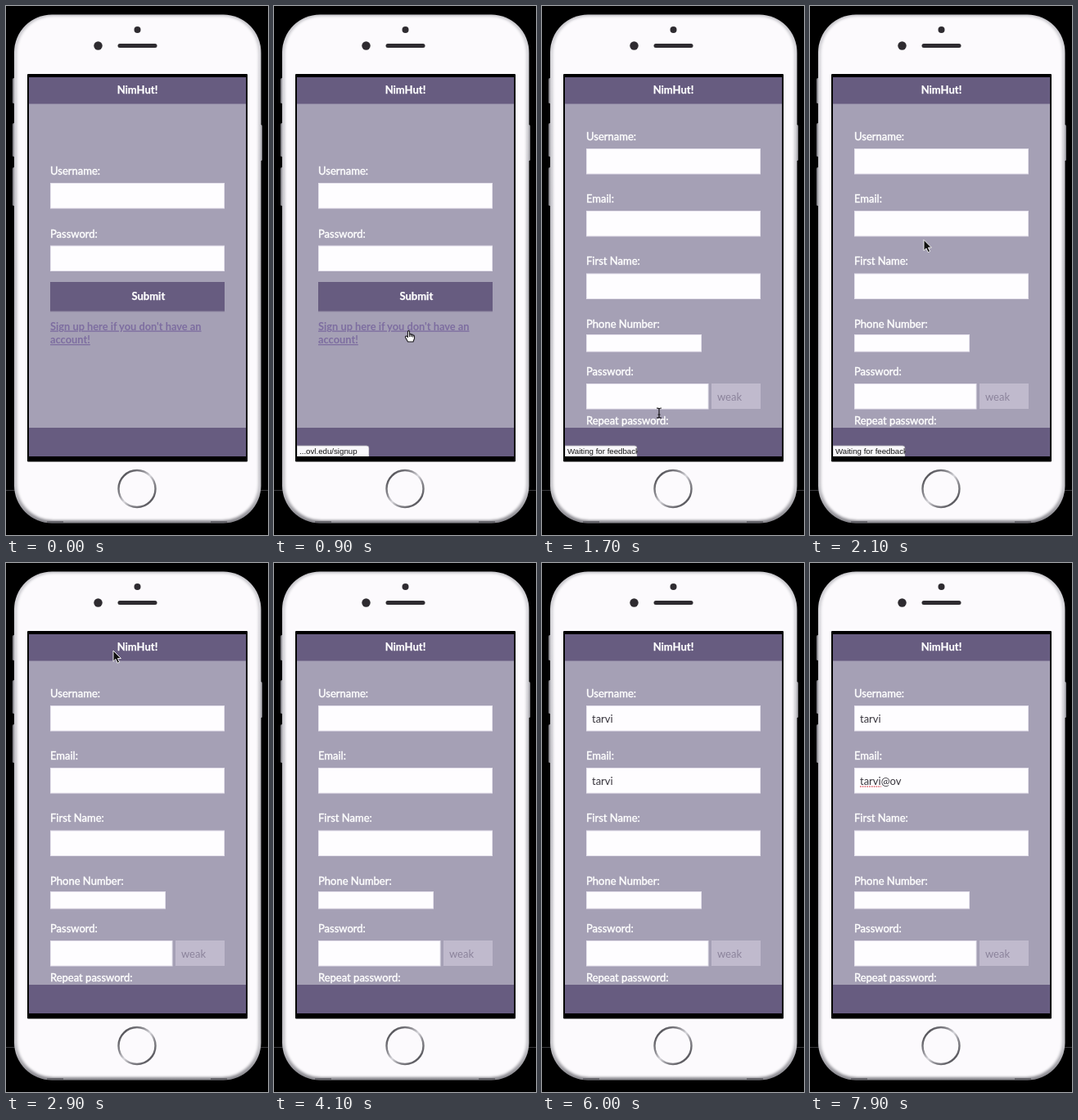
An HTML page that plays this animation: 320 by 646 pixels, repeating every 8 s.

```html
<!DOCTYPE html>
<html lang="en">
<head>
<meta charset="utf-8">
<title>Sign up on a phone</title>
<style>
  html, body { margin: 0; width: 100%; height: 100%; overflow: hidden; background: #000; }
  svg { display: block; width: 100%; height: 100%; }
  text { font: 13px Lato, sans-serif; fill: #fff; white-space: pre; }
  .label { stroke: #fff; stroke-width: .4px; }
  .bold { font-weight: 700; stroke: #fff; stroke-width: .25px; }
  .link { font-weight: 700; font-size: 12.83px; fill: #7d6da0; }
  .typed { fill: #38353d; }
  .weak { fill: #8b839b; }
  .status { font: 9.7px "Liberation Sans", Arial, sans-serif; fill: #111; }
  .bar { fill: #675c80; }
  .field { fill: #fefdff; stroke: #e6e2ed; }
  [hidden] { display: none; }
</style>
</head>
<body>
<svg viewBox="0 0 320 646" xmlns="http://www.w3.org/2000/svg">
  <defs>
    <linearGradient id="rim" x1="0" y1="0" x2="0" y2="1">
      <stop offset="0" stop-color="#c4c3c8"/>
      <stop offset=".08" stop-color="#d6d5da"/>
      <stop offset=".5" stop-color="#bcbbc1"/>
      <stop offset=".93" stop-color="#c4c3c8"/>
      <stop offset="1" stop-color="#85848a"/>
    </linearGradient>
    <linearGradient id="ring" x1="0" y1="0" x2="1" y2="1">
      <stop offset="0" stop-color="#38373c"/>
      <stop offset=".35" stop-color="#8c8b91"/>
      <stop offset=".5" stop-color="#d8d7dc"/>
      <stop offset=".65" stop-color="#8c8b91"/>
      <stop offset="1" stop-color="#3c3b40"/>
    </linearGradient>
    <filter id="soft" x="-5%" y="-5%" width="110%" height="110%"><feGaussianBlur stdDeviation="1.4"/></filter>
    <clipPath id="body"><rect x="10" y="10.5" width="301.5" height="621" rx="46"/></clipPath>
    <clipPath id="screen"><rect x="28" y="87" width="265" height="463"/></clipPath>
    <clipPath id="bubble"><rect x="28" y="536" width="88.5" height="14"/></clipPath>
  </defs>

  <rect width="320" height="646"/>
  <path d="M0 591.5H320" stroke="#39383c"/>

  <g fill="#8f8e94">
    <rect x="8" y="88" width="4" height="31" rx="1.5"/>
    <rect x="8" y="143" width="4" height="41" rx="1.5"/>
    <rect x="8" y="197" width="4" height="47" rx="1.5"/>
    <rect x="309" y="145" width="4" height="44" rx="1.5"/>
  </g>
  <g clip-path="url(#body)">
    <rect x="10" y="10" width="302" height="622" fill="url(#rim)"/>
    <rect x="13.5" y="12.5" width="294.5" height="615.5" rx="44" fill="#fcfafd" filter="url(#soft)"/>
    <path d="M50 630h20M250 630h20" stroke="#66656b" stroke-width="2"/>
  </g>

  <g fill="#2e2b30">
    <circle cx="160.5" cy="29" r="4"/>
    <circle cx="112.5" cy="48.5" r="5.2"/>
    <rect x="136.5" y="46" width="48" height="5" rx="2.5"/>
  </g>
  <circle cx="160" cy="589.5" r="22.5" fill="#fcfafd" stroke="url(#ring)" stroke-width="2.4"/>

  <rect x="26" y="83" width="269" height="473.5" rx="1"/>
  <g clip-path="url(#screen)">
    <rect x="28" y="119" width="266" height="397" fill="#a5a0b5"/>
    <g id="login"></g>
    <g id="signup"></g>
    <rect class="bar" x="28" y="87" width="266" height="32.5"/>
    <rect class="bar" x="28" y="515" width="266" height="36"/>
    <text class="bold" x="160.5" y="106.5" text-anchor="middle">NimHut!</text>
    <g id="tip" clip-path="url(#bubble)">
      <path d="M28 537H113q3 0 3 3v11H28z" fill="#f9f8fb" stroke="#aaa7b0" stroke-width=".8"/>
      <text id="tipText" class="status" x="31" y="547"></text>
    </g>
    <g id="cursor">
      <path id="arrow" d="M0 0V13.2L3 10.4 5.2 15.2 7.6 14.1 5.4 9.5H9.4Z" fill="#111" stroke="#fff" stroke-width=".9"/>
      <g id="hand" fill="#fff" stroke="#1b1a1d" stroke-width="1.1" stroke-linejoin="round">
        <path d="M-2.5 7L-5.5 1.8Q-6-.4-3.6.3L-2.6 1.5V-5.5Q-1.6-7.2-.5-5.5V-2Q.8-3 1.7-1.6 3-2.4 3.7-1 5.4-1.4 5.5.6V3L4 7Z"/>
        <path d="M-.4-2V1M1.7-1.6V1M3.7-1V1.5" fill="none"/>
      </g>
      <path id="beam" d="M-3-6Q0-6 0-4.5 0-6 3-6M0-4.5V4.5M-3 6Q0 6 0 4.5 0 6 3 6M-1.5 2H1.5" fill="none" stroke="#18171a" stroke-width="1.2"/>
    </g>
  </g>
</svg>

<script>
const LOOP = 8000, STEP = 100;
const $ = id => document.getElementById(id);

const label = (s, y) => `<text class="label" x="54" y="${y}">${s}</text>`;
const field = (y, w = 213, h = 31.5) =>
  `<rect class="field" x="54.5" y="${y + .5}" width="${w - 1}" height="${h - 1}"/>`;
const link = (s, y) =>
  `<text class="link" x="54" y="${y}" text-decoration="underline">${s}</text>`;

$("login").innerHTML =
  label("Username:", 206) + field(216) +
  label("Password:", 282.5) + field(292.5) +
  `<rect x="54" y="338" width="213" height="35.5" fill="#8d86a0"/>
   <rect class="bar" x="54" y="337" width="213" height="35.5"/>
   <text class="bold" x="153.5" y="359">Submit</text>` +
  link("Sign up here if you don't have an", 395.5) + link("account!", 412);

$("signup").innerHTML =
  label("Username:", 164) + field(174) +
  label("Email:", 240) + field(250) +
  label("First Name:", 316) + field(326.5) +
  label("Phone Number:", 392.5) + field(401, 141, 21.5) +
  label("Password:", 450.5) + field(461, 149.5) +
  label("Repeat password:", 511) +
  `<rect x="207" y="461" width="60" height="31" fill="#c0bacd"/>
   <text class="weak" x="214" y="481.5">weak</text>
   <text id="user" class="typed" x="61" y="194.5"></text>
   <text id="mail" class="typed" x="61" y="270.5"></text>
   <path id="squiggle" d="M61 273H87" stroke="#e0606c" stroke-width="1.4" stroke-dasharray="1.6 1.2"/>`;

// [time, letters shown]
const userKeys = [[0, 0], [5000, 1], [5100, 2], [5200, 3], [5300, 4], [5400, 5]];
const mailKeys = [[0, 0], [5900, 3], [6000, 5], [7400, 6], [7700, 7], [7900, 8]];
// [time, x, y, shape]
const path = [
  [100, 236, 540, "arrow"], [900, 166, 403, "hand"], [1600, 150, 401, "hand"],
  [1700, 143, 497, "beam"], [1900, 143, 478, "arrow"], [2300, 135, 93, "arrow"],
  [2900, 131, 107, "arrow"], [3500, 122, 190, "beam"], [3900, 122, 190, "beam"]
];

const lastKey = (keys, t) => keys.filter(k => k[0] <= t).pop();
const show = (id, on) => $(id).toggleAttribute("hidden", !on);

function moveCursor(t) {
  const a = lastKey(path, t);
  const b = path.find(k => k[0] > t);
  show("cursor", a && b);
  if (!a || !b) return;
  const p = (t - a[0]) / (b[0] - a[0]);
  const e = p * p * (3 - 2 * p);
  const at = i => a[i] + (b[i] - a[i]) * e;
  $("cursor").setAttribute("transform", `translate(${at(1)} ${at(2)})`);
  for (const shape of ["arrow", "hand", "beam"]) show(shape, shape === a[3]);
}

function draw(now) {
  const t = Math.floor(now % LOOP / STEP) * STEP;
  show("login", t < 1700);
  show("signup", t >= 1700);
  show("tip", t >= 900 && t < 2500);
  $("tipText").textContent = t < 1700 ? "...ovl.edu/signup" : "Waiting for feedback";
  $("user").textContent = "tarvi".slice(0, lastKey(userKeys, t)[1]);
  $("mail").textContent = "tarvi@ov".slice(0, lastKey(mailKeys, t)[1]);
  show("squiggle", t >= 7400);
  moveCursor(t);
}

const start = performance.now();
function tick() {
  draw(performance.now() - start);
  requestAnimationFrame(tick);
}
tick();
</script>
</body>
</html>
```
